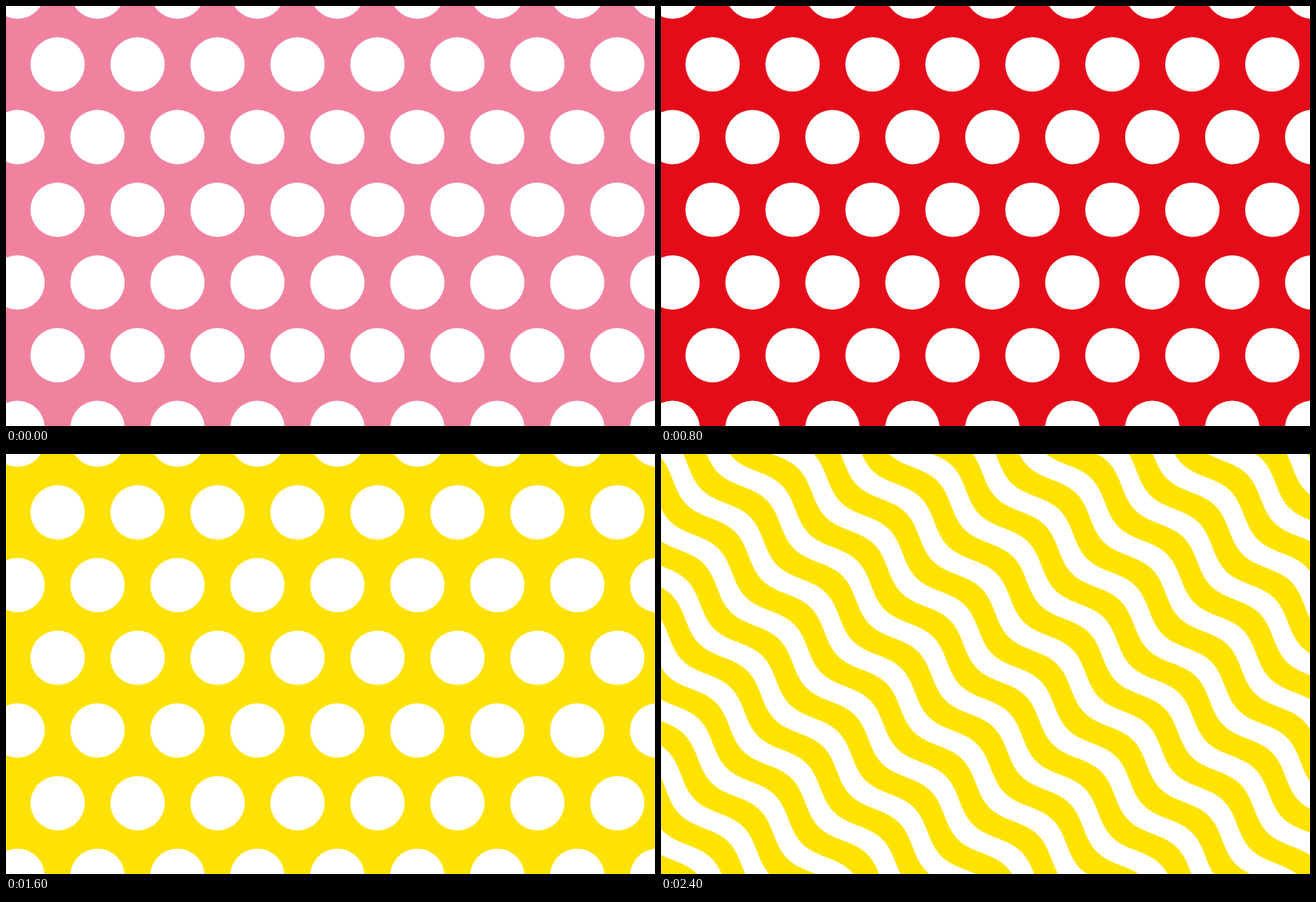
An HTML page with a canvas that plays this animation: 860x556 px, repeating every 2.8 s.

```html
<!DOCTYPE html>
<html lang="en">
<head>
<meta charset="utf-8">
<title>Pattern loop</title>
<style>
  html, body { margin: 0; width: 100%; height: 100%; overflow: hidden; background: #fff; }
  canvas { display: block; }
</style>
</head>
<body>
<canvas id="stage" width="860" height="556"></canvas>
<script>
const W = 860, H = 556, STEP = 400;
const PINK = '#f082a0', YELLOW = '#ffe205', RED = '#e40c18';
const ctx = document.getElementById('stage').getContext('2d');

function clear(color) {
  ctx.fillStyle = color;
  ctx.fillRect(0, 0, W, H);
}

function fillPolygon(points) {
  ctx.beginPath();
  points.forEach(([x, y]) => ctx.lineTo(x, y));
  ctx.fill();
}

function dots(color) {
  clear(color);
  ctx.fillStyle = '#fff';
  for (let row = 0; row < 7; row++) {
    const left = row % 2 ? 68.4 : 15.3;
    for (let col = 0; col < 9; col++) {
      ctx.beginPath();
      ctx.arc(left + col * 105.95, -19 + row * 96.25, 36, 0, 2 * Math.PI);
      ctx.fill();
    }
  }
}

// Bands measured along the top edge; lean is the sideways shift per pixel of height.
function stripes(color, start, period, width, lean) {
  clear('#fff');
  ctx.fillStyle = color;
  const shift = lean * H;
  for (let k = -8; k < 16; k++) {
    const x = start + k * period;
    fillPolygon([[x, 0], [x + width, 0], [x + width + shift, H], [x + shift, H]]);
  }
}

// Sine bands along the falling diagonal, in sum = x + y and diff = x - y.
function waves(color) {
  clear('#fff');
  ctx.fillStyle = color;
  const edge = (base, sums) => sums.map(sum => {
    const diff = base + 14 * Math.sin(2 * Math.PI * (sum - 151) / 200.7);
    return [(sum + diff) / 2, (sum - diff) / 2];
  });
  const sums = Array.from({ length: 380 }, (_, i) => i * 4 - 50);
  const back = [...sums].reverse();
  for (let k = -8; k < 12; k++) {
    const base = 20.7 + k * 83.85;
    fillPolygon([...edge(base, sums), ...edge(base + 44.2, back)]);
  }
}

const scenes = [
  () => dots(PINK),
  () => stripes(YELLOW, 32, 81.56, 38.5, 0),
  () => dots(RED),
  () => stripes(RED, 22, 115.35, 55, -1),
  () => dots(YELLOW),
  () => stripes(PINK, 68.7, 115.4, 55.3, 1),
  () => waves('#ffe300')
];

const begin = performance.now();
let shown = -1;

function play() {
  const index = Math.floor((performance.now() - begin) / STEP) % scenes.length;
  if (index !== shown) {
    scenes[index]();
    shown = index;
  }
  requestAnimationFrame(play);
}
play();
</script>
</body>
</html>
```
